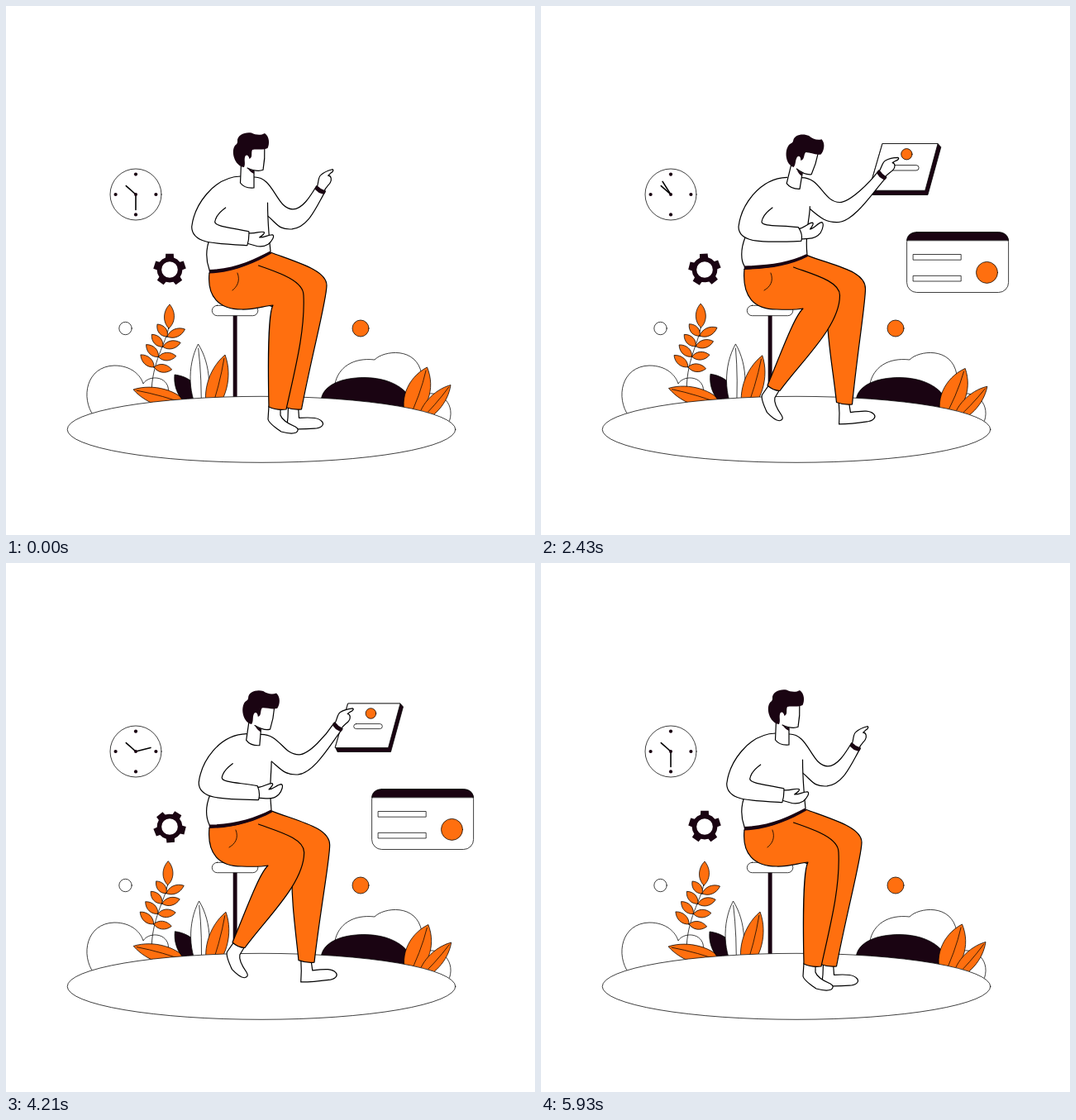
Recreate the animation shown at these times as an HTML page. Size 640 by 640 pixels, loop 6 s.

```html
<!DOCTYPE html>
<html lang="en">
<head>
<meta charset="utf-8">
<title>Interface scene</title>
<style>
  html, body { margin: 0; width: 100%; height: 100%; overflow: hidden; background: #fff; }
  svg { display: block; width: 100vw; height: 100vh; }
  path, circle, ellipse, rect { stroke: #000; stroke-linejoin: round; stroke-linecap: round; }
  .w { fill: #fff; }
  .o { fill: #ff6f0f; }
  .d { fill: #1a0412; }
  .n { fill: none; }
  .solid { stroke: none; }
  .scene { stroke-width: .75; }
  .man { stroke-width: 1.2; }
</style>
</head>
<body>
<svg viewBox="0 0 640 640">
  <defs>
    <clipPath id="cardClip"><rect id="cardWipe" y="260" height="100"/></clipPath>
    <clipPath id="panelClip"><rect id="panelWipe" y="150" height="90"/></clipPath>
  </defs>
  <g class="scene">
    <circle class="w" cx="157" cy="228" r="31"/>
    <g id="dots"></g>
    <path class="n" stroke-width="1.6" d="M157 228L145.3 217.6"/>
    <path class="n" id="minute" stroke-width="1.6" d="M157 228V209.5"/>
    <circle class="d solid" cx="157" cy="228" r="2"/>
    <path class="d solid" id="gear"/>
    <circle class="w solid" cx="198" cy="319" r="9.8"/>
    <circle class="w" cx="144.5" cy="390" r="7.7"/>
    <circle class="o" cx="429" cy="390" r="10"/>

    <path class="w" d="M106 496C90 474 97 436 131 435C152 435 163 447 166 457C172 447 192 447 196 461L200 490"/>
    <g id="leftPlants"></g>
    <path class="w" d="M398 457C402 437 420 425 446 428C456 417 497 411 503 446L506 470C526 464 546 482 535 506"/>
    <path class="d" d="M381 478C382 459 405 449.5 434 449.5C462 450 480 460 489 474L482 500H390Z"/>
    <g id="rightPlants"></g>
    <rect class="d solid" x="274.7" y="374" width="4.9" height="110"/>
    <ellipse class="w" cx="309" cy="512.3" rx="234.8" ry="40"/>
    <rect class="w" x="249.3" y="362.3" width="55.5" height="12.4" rx="6.2"/>

    <g clip-path="url(#cardClip)">
      <rect class="w" x="442.6" y="273.7" width="123" height="72.8" rx="12"/>
      <path class="d" d="M442.6 283.4C443 277 448 273.7 454.6 273.7H553.6C560 273.7 565 277 565.6 283.4Z"/>
      <rect class="w" x="450.5" y="300.5" width="57.7" height="6.7"/>
      <rect class="w" x="450.5" y="326.4" width="57.7" height="6.6"/>
      <circle class="o" cx="539.5" cy="322.4" r="13"/>
    </g>
    <g clip-path="url(#panelClip)">
      <g id="panel">
        <path class="d" d="M414 170H477L480.5 174L465.5 228.5H401L398.5 223Z"/>
        <path class="w" d="M414 170H477L462.5 223.5H398.5Z"/>
        <circle class="o" cx="441.4" cy="182" r="6.3"/>
        <rect class="w" x="420.7" y="194.6" width="34.6" height="6" rx="3"/>
      </g>
    </g>
  </g>

  <g class="man">
    <path class="w" id="farFoot" d="M-6 -3L-6.5 11L-8 24.3C8 25.5 20 24.5 28 24C35 23 37.5 19 35 16C31 11 24 10.5 7 11.3L6 -3"/>
    <path class="o" id="farLeg"/>
    <path class="w" id="nearFoot" d="M-7 -3L-8 13C-7 18 2 24 8 28C15 30 22 31 26 29C29 27 29 24 25 22C18 19 9 14 7 8L7 -3"/>
    <path class="o" id="nearLeg"/>
    <path class="n" id="pocket" stroke-width=".8"/>
    <path class="w" id="frontArm"/>
    <g id="frontHand">
      <path class="w" d="M-5 1C-6 -5 -10 -10 -8.5 -14C-7 -19 -4 -23 0 -27C2 -28 2.4 -25 .6 -22L-.5 -18C3 -20 6 -16 6 -12C6 -8 4 -5 5 1"/>
      <path class="n" stroke-width="5.2" style="stroke:#1a0412" d="M-4 2Q0 3.4 4.4 2"/>
    </g>
    <path class="w solid" id="torso"/>
    <path class="n" id="sides"/>
    <path class="d solid" id="belt"/>
    <path class="w" id="backHand" d="M-1 -6.5C8 -6 13 -11 18 -10C20 -9 17 -6 13.5 -3C19 -3 24 -8 29 -8C32 -7 29 0 25 4C20 8 14 8.5 9 7.5L-1 6"/>
    <path class="w" id="backArm"/>
    <path class="w" id="neck"/>
    <g id="head">
      <path class="w solid" d="M286 178L312.8 170C313.4 182 312.5 190 311 198.3C307 200 300 199.5 292 196L286 192Z"/>
      <path class="n" d="M312.8 171C313.4 182 312.5 190 311 198.3C307 200 300 199.5 292 196"/>
      <path class="d solid" d="M292 195.6Q296 199 300.5 199.3L300 203Q295 201 292 195.6Z"/>
      <path class="d solid" d="M288 195C278 194 273 180 275.5 172C277 167 280 168 280 164C279 156 290 152 297 153.6C302 156 308 157 313 154C319 158 319 167 316.5 172C310 175 304 172.5 298 174C296 178 299 183 294.5 185C293.5 180 290 179 289 183C288 187 290 191 288 195Z"/>
    </g>
  </g>
</svg>
<script>
const LOOP = 6000, END = 5930; // everything is back at rest by END
const $ = id => document.getElementById(id);
const set = (id, name, value) => $(id).setAttribute(name, value);
const draw = (id, d) => set(id, 'd', d);
const place = (id, x, y, a) => set(id, 'transform', `translate(${x} ${y}) rotate(${a})`);
const clamp = v => Math.max(0, Math.min(1, v));
const ease = (t, from, to) => (1 - Math.cos(Math.PI * clamp((t - from) / (to - from)))) / 2;
const mix = (a, b, k) => a + (b - a) * k;
const rad = a => a * Math.PI / 180;

// Four drivers, each 0 at rest; every joint follows from them.
const drivers = t => ({
  lean: ease(t, 0, 1560) - .4 * ease(t, 1560, 2700) - .6 * ease(t, 3300, 5300),
  cross: ease(t, 0, 930) - ease(t, 4750, 5900),
  reach: ease(t, 930, 1650) - ease(t, 3800, 5000),
  stride: ease(t, 900, 2150) - ease(t, 3900, 5000)
});

function leaf(x0, y0, x1, y1, w, cls = 'o', vein = true) {
  const dx = x1 - x0, dy = y1 - y0, len = Math.hypot(dx, dy);
  const at = (k, s) => `${x0 + dx * k - dy / len * s} ${y0 + dy * k + dx / len * s}`;
  const mid = vein ? `<path class="n" d="M${x0} ${y0}Q${at(.5, w * .2)} ${at(.94, 0)}"/>` : '';
  return `<path class="${cls}" d="M${x0} ${y0}C${at(.25, w)} ${at(.7, w)} ${x1} ${y1}C${at(.7, -w)} ${at(.25, -w)} ${x0} ${y0}Z"/>${mid}`;
}

const swaying = [];
function plant(parent, x, y, angle, markup) {
  const g = document.createElementNS('http://www.w3.org/2000/svg', 'g');
  g.innerHTML = markup;
  $(parent).append(g);
  swaying.push({ g, x, y, angle });
}
const single = (parent, angle, x, y, ...rest) => plant(parent, x, y, angle, leaf(x, y, ...rest));

function branch() {
  let s = '<path class="n" d="M197 388C194 408 176 430 176 470"/>' + leaf(197, 390, 198, 361, 8, 'o', false);
  for (let i = 0; i < 4; i++) {
    const x = 195 - 5.3 * i, y = 400 + 12.3 * i;
    s += leaf(x, y, x - 12 - 1.4 * i, y - 15, 6.5, 'o', false);
    s += leaf(x, y, x + 21.5, y - 9 + 4 * i, 6.5, 'o', false);
  }
  return s;
}

plant('leftPlants', 176, 462, -6.3, branch());
single('leftPlants', 3, 222, 483, 154, 464, 14);
single('leftPlants', 3, 238, 488, 204, 446, 16, 'd', false);
single('leftPlants', 4.5, 236, 495, 232.5, 409, 15, 'w');
single('leftPlants', 5, 246, 495, 265, 422, 16);
single('rightPlants', 7.5, 486, 502, 509.5, 437, 19);
single('rightPlants', 5.5, 498, 504, 538, 458.5, 12);

for (let a = 0; a < 360; a += 90)
  $('dots').innerHTML += `<circle class="d solid" cx="157" cy="203.6" r="2.1" transform="rotate(${a} 157 228)"/>`;

function gear(cx, cy, teeth) {
  const step = 360 / teeth, pts = [];
  const add = (a, r) => pts.push(`${cx + r * Math.sin(rad(a))} ${cy - r * Math.cos(rad(a))}`);
  for (let a = 0; a < 360; a += step) {
    add(a - 19, 15.4);
    add(a - 14, 19.8);
    add(a + 14, 19.8);
    add(a + 19, 15.4);
    add(a + step / 2, 15.4);
  }
  return `M${pts.join('L')}Z`;
}
draw('gear', gear(198, 319, 5));

function drawLegs({ lean, cross, stride }) {
  const m = (a, b) => mix(a, b, cross);
  const beltY = 323 - 7 * lean, topX = 320 + 3 * lean, topY = 298 + 5.5 * lean;

  const hx = 348 + 19 * stride, hy = 487 - 6 * stride;
  const px = 388 + 4.5 * stride, py = 338 + 4 * stride;
  const rx = hx + 9.5, lx = hx - 9.5;
  place('farFoot', hx - .5, hy, -5 * stride);
  draw('farLeg', `M246 ${beltY}C275 ${beltY - 1} 300 ${topY + 12} ${topX} ${topY}
    C355 ${topY + 13} ${px} 320 ${px} ${py}
    C${px} ${py + 18} ${rx + .4 * (px - rx)} ${hy - 64} ${rx} ${hy + 1}Q${hx} ${hy + 2} ${lx} ${hy - 1.5}
    C${lx - 4} ${hy - 40} ${337 + .5 * (lx - 338)} 408 346 372L283 350Z`);

  const kx = px - 28 - 3 * cross, ky = 350;
  const cx = m(323, 317), cy = m(362, 366);
  const ax = m(318, 274), ay = m(485, 459), bx = m(339, 289), by = m(488, 465.5);
  place('nearFoot', m(325, 281), m(487, 463.5), m(0, 31));
  draw('nearLeg', `M246 ${beltY}C243 352 258 367 285 367C300 367.5 312 ${cy + 1} ${cx} ${cy}
    C${cx - m(6, 11)} ${cy + 10} ${ax + m(-1, 16)} ${ay - m(45, 38)} ${ax} ${ay}
    Q${(ax + bx) / 2 - 1} ${(ay + by) / 2 + 3} ${bx} ${by}
    C${bx + m(11, 26)} ${by - m(50, 36)} ${kx + m(2, 0)} ${ky + m(43, 38)} ${kx} ${ky}
    C${kx} 333 ${m(332, 330)} ${m(323, 325)} 305.5 ${m(314, 316)}`);
  draw('pocket', `M${m(280, 278)} 323C${m(284, 282)} 333 ${m(279, 277)} 340 ${m(274, 270)} 344`);
  draw('belt', `M245.5 ${beltY - 4}C275 ${beltY - 4.5} 300 ${topY + 9} ${topX - .5} ${topY - 1.5}
    L${topX + 1} ${topY + 1.5}C300 ${topY + 13.5} 275 ${beltY - .5} 246 ${beltY + .5}Z`);
}

function drawBackArm({ lean, cross, reach }, nx, ny) {
  const bend = reach + .35 * (1 - cross), turn = 18 - 31 * bend;
  const ex = 217 + 22 * bend, ey = 267 - 15 * lean * (1 - bend);
  const hx = 282 + 31 * bend, hy = 284 - 8 * bend;
  const ox = 8 * Math.sin(rad(turn)), oy = 8.5 * Math.cos(rad(turn));
  const tx = hx + ox, ty = hy - oy, wx = hx - ox, wy = hy + oy;
  const kx = ex + 28, ky = ey - 6, dx = wx - ex, dy = wy - ey;
  draw('backArm', `M${nx} ${ny}C${nx - 34} ${ny + 1} ${ex + 3} ${ey - 25} ${ex} ${ey}
    C${ex} ${ey + 20} ${wx - .62 * dx} ${wy - .8 * (dy - 20)} ${wx} ${wy}Q${wx + 2.5} ${wy - 8} ${tx} ${ty}
    C${mix(tx, kx, .5)} ${mix(ty, ky, .4)} ${kx} ${ky + 6} ${kx} ${ky}C${kx + 1} ${ky - 6} ${kx + 6} ${ky - 12} ${kx + 13} ${ky - 17}`);
  place('backHand', hx, hy, turn);
}

function drawFrontArm({ lean, cross, reach }, rx, ry, sx, sy) {
  const hx = 381 + 18 * lean + 20.5 * reach, hy = 221 - 31 * cross + 20 * lean;
  const turn = 32 + .4 * (hx - 385), s = Math.sin(rad(turn)), c = Math.cos(rad(turn));
  const ux = hx - 6.2 * c, uy = hy - 6.2 * s, lx = hx + 6.2 * c, ly = hy + 6.2 * s;
  const cx = rx + 47, cy = 229 + .65 * (hy - 195) + 5 * lean;
  const bx = cx - 1, by = cy + 24;
  draw('frontArm', `M${rx} ${ry}C${rx + 24} ${ry - 1} ${cx - 20} ${cy} ${cx} ${cy}
    C${cx + 12} ${cy} ${ux - .24 * (ux - cx)} ${uy + .4 * (cy - uy)} ${ux} ${uy}L${lx} ${ly}
    C${lx - 22 * s} ${ly + 22 * c} ${bx + 20} ${by - 2} ${bx} ${by}
    C${bx - 16} ${by + 1} ${sx + 12} ${by - 6} ${sx} ${by - 16}`);
  place('frontHand', hx, hy, turn);
}

function drawBody(d) {
  const { lean } = d;
  const nx = 284 + 21 * lean, ny = 206 + 2 * lean;
  const rx = 300 + 22 * lean, ry = 207 + lean;
  const sx = 316.5 + 13.5 * lean, sy = 238 + 7 * lean;
  const endX = 320 + 3 * lean, endY = 297 + 6 * lean, beltY = 319 - 7 * lean;
  const right = `C${sx} ${sy + 16} ${endX - 3} ${endY - 30} ${endX} ${endY}`;
  const left = 'C242 308 241 295 247 280';
  draw('torso', `M${nx} ${ny + 1}L${rx} ${ry + 1}L${sx} ${sy}${right}L246 ${beltY}${left}V241Z`);
  draw('sides', `M${sx} ${sy}${right}M246 ${beltY}${left}`);
  drawBackArm(d, nx, ny);
  drawFrontArm(d, rx, ry, sx, sy);
}

function drawHead({ lean }) {
  const turn = 21 * lean, c = Math.cos(rad(turn)), s = Math.sin(rad(turn));
  const ox = 25 * lean, oy = 4 * lean;
  const at = (x, y) => {
    const dx = x - 299, dy = y - 199;
    return `${299 + ox + dx * c - dy * s} ${199 + oy + dx * s + dy * c}`;
  };
  const lx = 283.5 + 21 * lean, ly = 214 + lean;
  draw('neck', `M${at(284.5, 190)}L${lx} ${ly}Q${lx + 5} ${ly + 7} ${300 + 20 * lean} ${220 + 2 * lean}L${at(300, 200)}`);
  set('head', 'transform', `translate(${ox} ${oy}) rotate(${turn} 299 199)`);
}

// Reveals and later hides from left to right.
function wipe(id, t, left, right, inFrom, inTo, outFrom, outTo) {
  const a = mix(left, right, ease(t, outFrom, outTo));
  const b = mix(left, right, ease(t, inFrom, inTo));
  set(id, 'x', a);
  set(id, 'width', Math.max(0, b - a));
}

function render(t) {
  const turn = 360 * t / END;
  const sway = (1 - Math.cos(rad(3 * turn))) / 2;
  for (const p of swaying) p.g.setAttribute('transform', `rotate(${p.angle * sway} ${p.x} ${p.y})`);
  set('minute', 'transform', `rotate(${180 + turn} 157 228)`);
  set('gear', 'transform', `rotate(${-turn} 198 319)`);

  wipe('cardWipe', t, 441, 567, 500, 1060, 5300, 5920);
  wipe('panelWipe', t, 396, 488, 300, 820, 5200, 5720);
  const press = 1 + .06 * Math.sin(Math.PI * clamp((t - 2000) / 860)) ** 2;
  set('panel', 'transform', `translate(425 228) scale(${press}) translate(-425 -228)`);

  const d = drivers(t);
  drawLegs(d);
  drawBody(d);
  drawHead(d);
}

const start = performance.now();
function tick() {
  render(Math.min(END, (performance.now() - start) % LOOP));
  requestAnimationFrame(tick);
}
tick();
</script>
</body>
</html>
```
